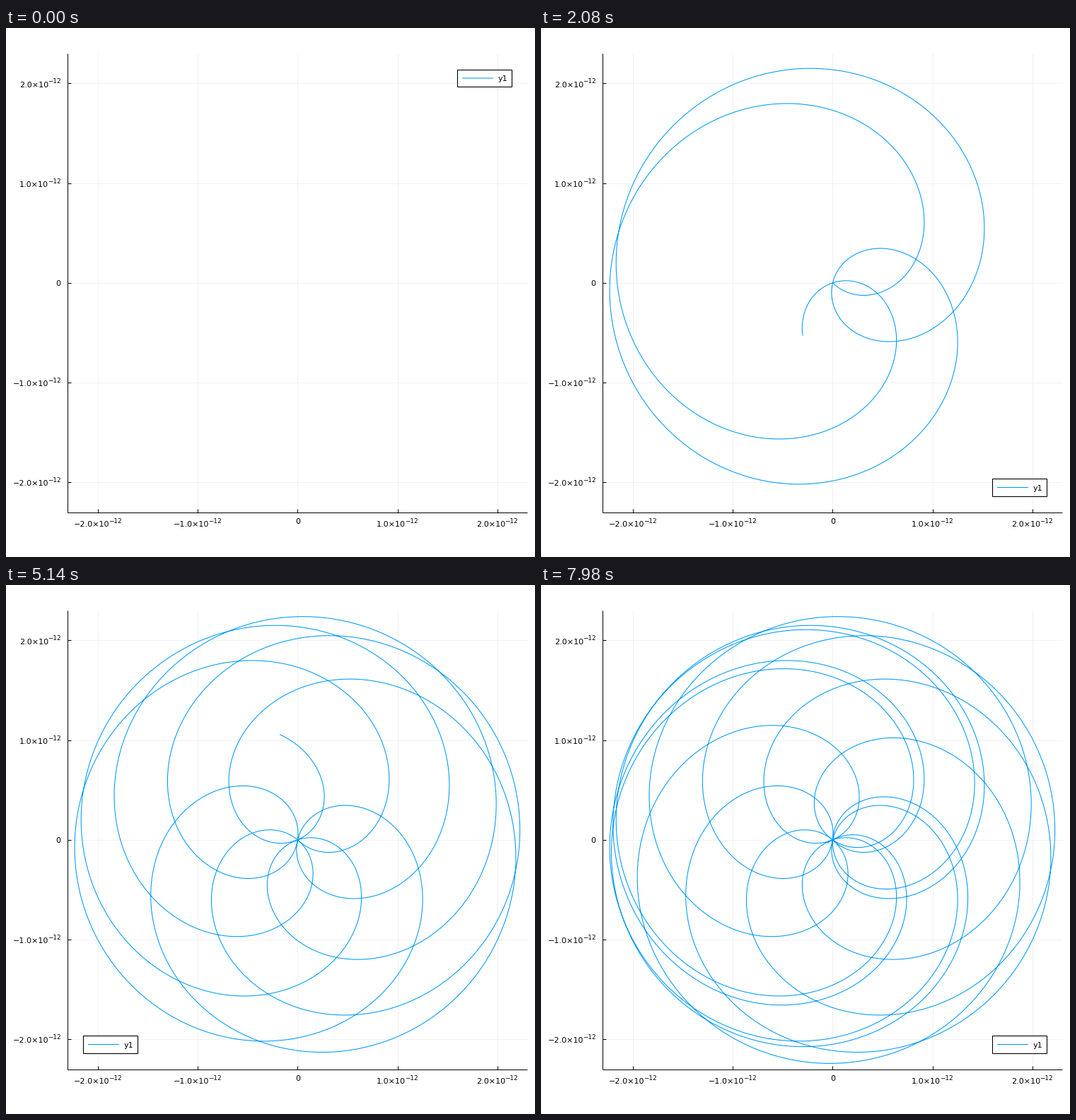
A matplotlib script for the animation above (8 s loop, 748 by 749 pixels).

```python
import numpy as np
import matplotlib.pyplot as plt
from matplotlib.animation import FuncAnimation
from matplotlib.patches import Rectangle

W, H, DPI = 748, 749, 128
FRAMES, INTERVAL = 400, 20
SUB = 8                      # curve samples per frame

LEFT, RIGHT, TOP, BOTTOM = 87.5, 737, 36, 685.5
CX, CY, UNIT = 412.4, 360.8, 141.2
RADIUS = 316.8
BEAT = 49.82                 # frames between two passes through the centre
SPIN = np.radians(9.668)     # turn per frame
BLUE = "#009AF9"

plt.rcParams["font.family"] = "DejaVu Sans"


def px(n):
    return n * 72 / DPI


fig = plt.figure(figsize=(W / DPI, H / DPI), dpi=DPI, facecolor="white")
ax = fig.add_axes([0, 0, 1, 1])
ax.set_xlim(0, W)
ax.set_ylim(H, 0)
ax.axis("off")


def stroke(x, y, color="black", width=1.0, **kw):
    return ax.plot(x, y, color=color, lw=px(width),
                   solid_capstyle="butt", **kw)[0]


def label(x, y, s, size=11.1, ha="right", **kw):
    return ax.text(x, y, s, fontsize=px(size), ha=ha, va="baseline", **kw)


def power(right, base, value):
    number = f"{value:.1f}×10".replace("-", "\u2212")
    label(right - 17.4, base, number)
    label(right, base - 5.2, "\u221212", size=8.9)


for k in range(-2, 3):
    x, y = CX + k * UNIT, CY - k * UNIT
    stroke([x, x], [TOP, BOTTOM], "#f1f1f1", zorder=1)
    stroke([LEFT, RIGHT], [y, y], "#f1f1f1", zorder=1)
    stroke([x, x], [BOTTOM, BOTTOM - 4.5], zorder=2)
    stroke([LEFT, LEFT + 4.5], [y, y], zorder=2)
    if k:
        power(x + (33.5 if k < 0 else 28.9), 706, k)
        power(77.4, y + 5.2, k)
    else:
        label(x, 702, "0", ha="center")
        label(77, y + 4.2, "0")

stroke([LEFT, LEFT], [TOP, BOTTOM + 0.5], zorder=2)
stroke([LEFT - 0.5, RIGHT], [BOTTOM, BOTTOM], zorder=2)

t = np.arange(FRAMES * SUB) / SUB
spiral = RADIUS * np.sin(np.pi * t / BEAT) * np.exp(1j * (SPIN * t - np.pi / 4))
curve_x, curve_y = CX + spiral.real, CY - spiral.imag
curve = stroke([], [], BLUE, 1.05, zorder=3)

box = Rectangle((0, 0), 77.5, 24.5, fc="white", ec="black", lw=px(1.1), zorder=5)
ax.add_patch(box)
key = stroke([], [], BLUE, 1.05, zorder=6, snap=False)
name = label(0, 0, "y1", ha="left", zorder=6)


def legend_corner(n):
    if n < 65:
        return 638, 58.7
    if 224 <= n < 269:
        return 109, 638.2
    return 638, 638.2


def draw(n):
    end = n * SUB + 1 if n else 0
    curve.set_data(curve_x[:end], curve_y[:end])
    x, y = legend_corner(n)
    box.set_xy((x, y))
    key.set_data([x + 7, x + 51], [y + 12.3, y + 12.3])
    name.set_position((x + 57.3, y + 16.5))
    return curve, box, key, name


anim = FuncAnimation(fig, draw, frames=FRAMES, interval=INTERVAL,
                     init_func=lambda: draw(0), repeat=True, repeat_delay=0)
plt.show()
```
